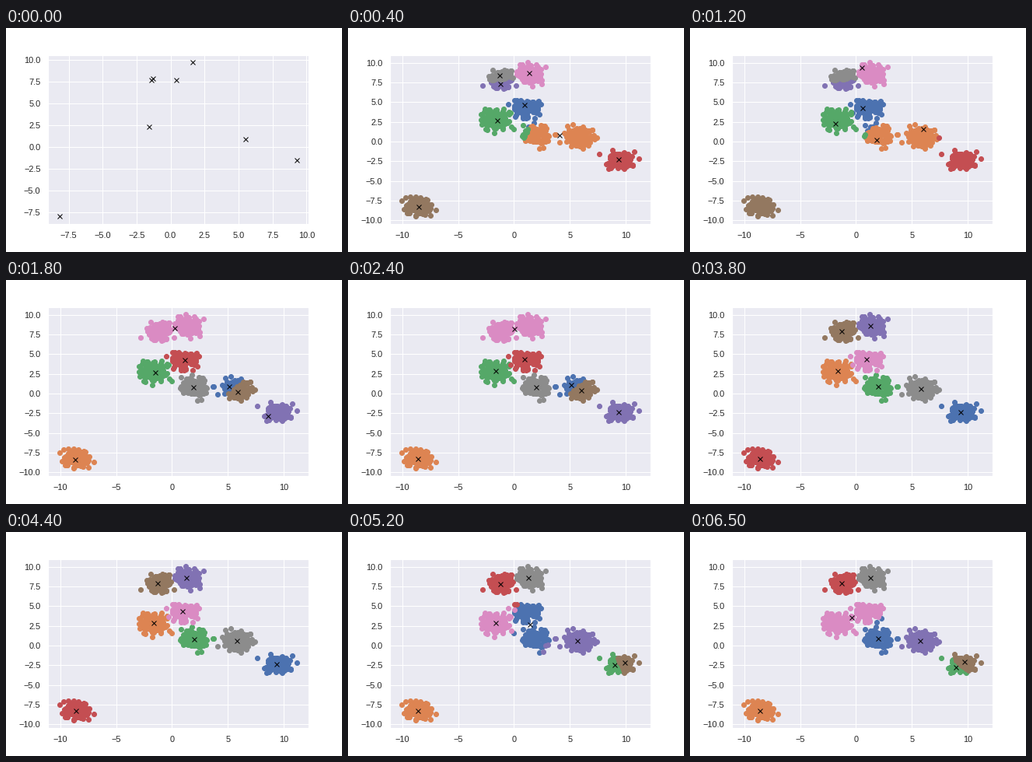
Recreate the animation shown at these times as a matplotlib script. Size 432 by 288 pixels, loop 6.6 s.

```python
import numpy as np
import matplotlib.pyplot as plt
from matplotlib.animation import FuncAnimation

FRAMES, INTERVAL = 66, 100
PALETTE = ["#4C72B0", "#DD8452", "#55A868", "#C44E52",
           "#8172B3", "#937860", "#DA8BC3", "#8C8C8C"]

plt.rcParams.update({
    "figure.figsize": (6, 4), "figure.dpi": 72,
    "figure.subplot.left": 0.125, "figure.subplot.right": 0.9,
    "figure.subplot.bottom": 0.125, "figure.subplot.top": 0.88,
    "font.family": "Liberation Sans", "font.size": 12,
    "axes.facecolor": "#EAEAF2", "axes.edgecolor": "white",
    "axes.linewidth": 1.25, "axes.axisbelow": True, "axes.grid": True,
    "grid.color": "white", "grid.linewidth": 1,
    "xtick.labelsize": 11, "ytick.labelsize": 11,
    "xtick.labelcolor": ".15", "ytick.labelcolor": ".15",
    "xtick.major.size": 6, "ytick.major.size": 6,
    "xtick.bottom": False, "ytick.left": False,
})

# Blob centres
BL, LEFT, MID, LOW = (-8.61, -8.32), (-1.64, 2.87), (0.97, 4.33), (2.0, 0.83)
RIGHT, FAR, TL, TR = (5.81, 0.6), (9.4, -2.4), (-1.26, 7.92), (1.32, 8.6)

# Extent of each blob: x range, y range
BLOBS = [
    (BL, -9.7, -7.4, -9.5, -6.9), (LEFT, -2.9, -0.3, 1.4, 4.25),
    (MID, 0.0, 2.45, 2.9, 5.4), (LOW, 0.6, 3.4, -0.7, 2.2),
    (RIGHT, 4.4, 7.2, -0.7, 1.9), (FAR, 8.0, 10.7, -3.5, -1.4),
    (TL, -2.3, -0.1, 6.6, 9.4), (TR, 0.1, 2.5, 7.4, 9.8),
]

OUTLIERS = [
    (-6.98, -8.75), (-10.04, -7.5), (-9.87, -8.6), (-9.72, -7.1),
    (11.2, -2.2), (10.77, -1.3), (7.6, -1.6), (8.85, -1.1),
    (-2.8, 7.1), (0.2, 7.1), (2.83, 9.5), (1.2, 10.05), (1.65, 7.05),
    (2.5, 7.35), (-0.55, 4.75), (-2.95, 3.45), (-2.95, 2.8), (-1.8, 1.1),
    (-0.05, 1.6), (-0.25, 1.9), (4.1, -0.1), (2.3, -0.9), (2.6, -0.8),
    (1.77, 2.4), (0.8, 2.1), (3.65, 0.9), (3.75, 0.85), (7.4, 0.45),
    (6.2, -0.9), (5.3, 2.2), (6.15, 1.9), (4.75, 2.0), (4.5, 1.1),
    (2.3, 3.45), (2.4, 4.8), (1.3, 1.9), (1.85, 3.0),
]

rng = np.random.default_rng(8)


def blob(centre, x0, x1, y0, y1, count=120):
    pts = rng.normal(centre, (0.64, 0.62), (8 * count, 2))
    inside = ((pts >= (x0, y0)) & (pts <= (x1, y1))).all(axis=1)
    return pts[inside][:count]


points = np.vstack([blob(*b) for b in BLOBS] + [OUTLIERS])


def scatter_near(goal):
    return np.array(goal) + rng.normal(0, 0.55, (8, 2))


first_seeds = [(0.42, 7.64), (5.5, 0.89), (-1.56, 2.32), (9.28, -1.53),
               (-1.41, 7.68), (-8.15, -7.96), (1.62, 9.69), (-1.27, 7.81)]
second_seeds = [(-8.6, -8.2), (9.3, -2.4), (-1.85, 2.25), (0.6, 4.25),
                (1.87, 0.2), (-1.2, 8.4), (0.55, 9.4), (6.05, 1.55)]

goal_a = [(1.0, 4.2), (3.9, 0.75), (-1.5, 2.7), FAR,
          (-1.2, 7.3), BL, TR, (-1.25, 8.45)]
goal_b = [BL, FAR, LEFT, MID, LOW, TL, TR, RIGHT]
goal_c = [(5.13, 1.1), BL, LEFT, MID, FAR, (6.0, 0.4), (0.04, 8.17), LOW]
goal_d = [LOW, FAR, LEFT, MID, RIGHT, BL, TL, TR]
goal_e = [FAR, LEFT, LOW, BL, TR, TL, MID, RIGHT]
goal_f = [(1.42, 2.63), BL, (9.05, -2.5), (-1.2, 7.78),
          (5.65, 0.57), (9.95, -2.2), LEFT, TR]
goal_g = [LOW, BL, (8.93, -2.8), TL, (5.78, 0.6), (9.75, -2.1),
          (-0.35, 3.55), TR]

# Start, seeds, converged centres, share of the distance kept per step
RUNS = [
    (0, first_seeds, goal_a, 0.6),
    (12, second_seeds, goal_b, 0.4),
    (17, scatter_near(goal_c), goal_c, 0.4),
    (26, scatter_near(goal_d), goal_d, 0.35),
    (34, scatter_near(goal_e), goal_e, 0.4),
    (46, scatter_near(goal_f), goal_f, 0.4),
    (52, goal_f, goal_g, 0.75),
]


def centres_at(i):
    start, seeds, goal, keep = [r for r in RUNS if r[0] <= i][-1]
    seeds, goal = np.array(seeds), np.array(goal)
    return goal + (seeds - goal) * keep ** (i - start)


def labels_at(i):
    # New seeds first appear over the previous run's colours
    if any(r[0] == i for r in RUNS):
        i -= 1
    gaps = points[:, None] - centres_at(i)[None]
    return (gaps ** 2).sum(axis=2).argmin(axis=1)


fig, ax = plt.subplots()
fig.patch.set_facecolor("white")
dots, marks = [], []
for colour in PALETTE:
    dots += ax.plot([], [], "o", color=colour, ms=6)
    marks += ax.plot([], [], "x", color="black", ms=6)


def set_view(xlim, ylim, xticks, yticks):
    ax.set(xlim=xlim, ylim=ylim, xticks=xticks, yticks=yticks)
    ax.set(xlim=xlim, ylim=ylim)


def update(i):
    if i == 0:
        ticks = np.arange(-7.5, 10.1, 2.5)
        set_view((-9.02, 10.14), (-8.84, 10.57), ticks, ticks)
    else:
        set_view((-11.11, 12.22), (-10.49, 11.03),
                 np.arange(-10, 11, 5), np.arange(-10, 10.1, 2.5))
    labels = labels_at(i) if i else np.full(len(points), -1)
    for k, (x, y) in enumerate(centres_at(i)):
        dots[k].set_data(*points[labels == k].T)
        marks[k].set_data([x], [y])
    return dots + marks


anim = FuncAnimation(fig, update, frames=FRAMES, interval=INTERVAL,
                     repeat=True, repeat_delay=0, blit=False)
plt.show()
```
